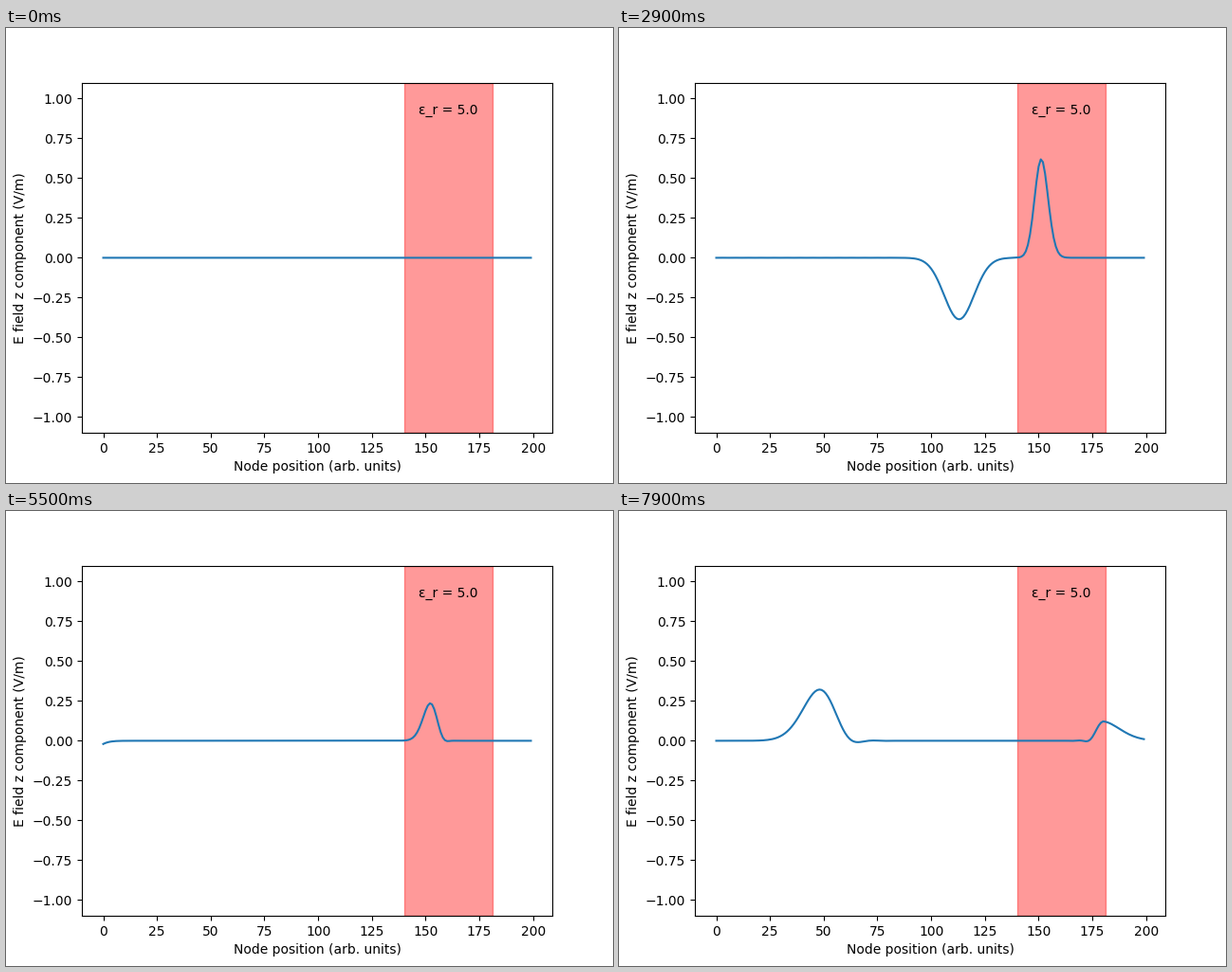
A matplotlib script that plays this animation: 640 by 480 pixels, repeating every 8000 ms.

```python
import numpy as np
import matplotlib.pyplot as plt
from matplotlib.animation import FuncAnimation

NODES = 200
SOURCE = 50
SLAB = (140, 181)
EPS_R = 5.0
FRAMES = 80
STEPS_PER_FRAME = 5


def pulse(t):
    return np.exp(-(t - 30) ** 2 / 100)


def simulate():
    """1D FDTD at Courant number 1, with H scaled by the free space impedance."""
    ez = np.zeros(NODES)
    hy = np.zeros(NODES)
    coef = np.ones(NODES)
    coef[SLAB[0]:SLAB[1]] = 1 / EPS_R
    states = []
    for t in range((FRAMES - 1) * STEPS_PER_FRAME + 1):
        # Absorbing ends, then a one-way source
        hy[-1] = hy[-2]
        hy[:-1] += ez[1:] - ez[:-1]
        hy[SOURCE - 1] -= pulse(t)
        ez[0] = ez[1]
        ez[1:] += coef[1:] * (hy[1:] - hy[:-1])
        ez[SOURCE] += pulse(t + 1)
        if t % STEPS_PER_FRAME == 0:
            states.append(ez.copy())
    return states


states = simulate()

fig, ax = plt.subplots(figsize=(6.4, 4.8), dpi=100)
nodes = np.arange(NODES)
line, = ax.plot(nodes, states[0])
ax.axvspan(*SLAB, color="red", alpha=0.4)
ax.text(sum(SLAB) / 2, 0.9, f"ε_r = {EPS_R}", ha="center")
margin = 0.05 * (NODES - 1)
ax.set_xlim(-margin, NODES - 1 + margin)
ax.set_ylim(-1.1, 1.1)
ax.set_xlabel("Node position (arb. units)")
ax.set_ylabel("E field z component (V/m)")


def update(i):
    line.set_ydata(states[i])
    return line,


anim = FuncAnimation(fig, update, frames=FRAMES, interval=100,
                     repeat=True, repeat_delay=0)
plt.show()
```
